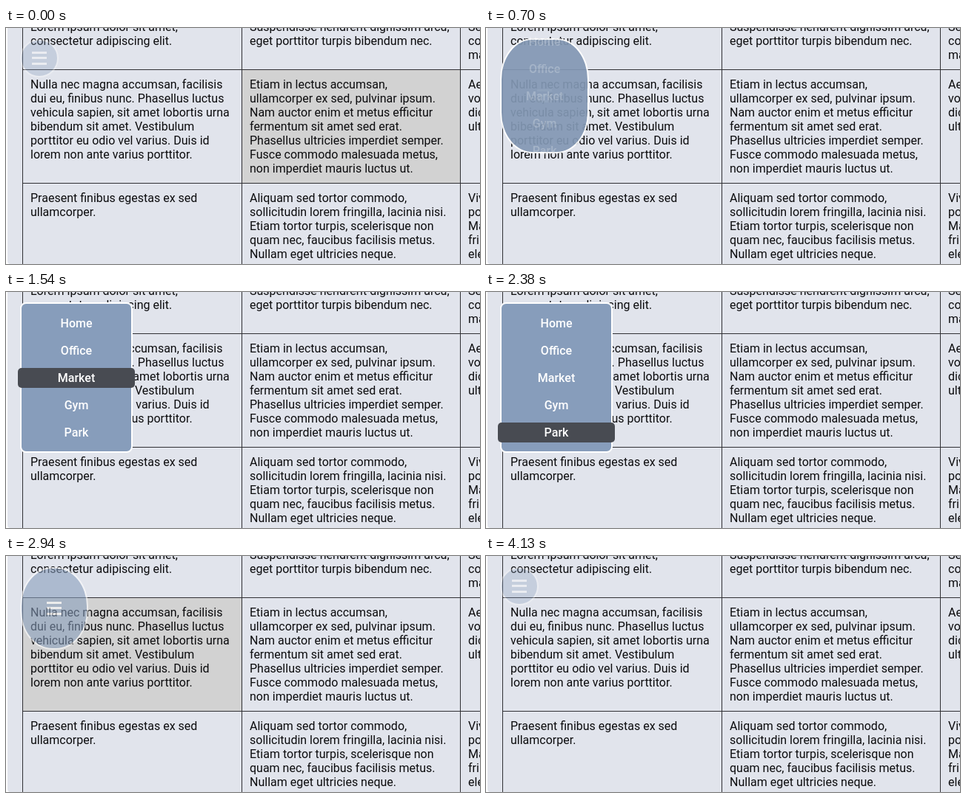
Animation, 640 px wide and 320 px high, one loop 4200 ms. Source, as an HTML page:

```html
<!DOCTYPE html>
<html lang="la">
<head>
<meta charset="utf-8">
<style>
html, body { margin: 0; width: 640px; height: 320px; overflow: hidden; background: #fff; }
body { position: relative; font: 16px/19px Roboto, sans-serif; color: #0c0c0e; }
#page { position: absolute; inset: 0 0 0 2px; background: #e1e4ec; border-bottom-left-radius: 4px; }
.cell {
  position: absolute; box-sizing: border-box; padding: 10px; white-space: pre;
  border: solid #303034; border-width: 1px 0 0 1px;
}
#menu { position: absolute; box-sizing: border-box; border: 2px solid #fff; color: #fff; }
#icon, #list { position: absolute; left: 50%; top: 50%; }
#icon i { position: absolute; left: -10px; width: 20px; height: 3px; background: #fff; }
.item {
  position: absolute; left: -79px; width: 158px; height: 27px;
  border-radius: 5px; text-align: center; font-weight: 500; line-height: 27px;
}
</style>
</head>
<body>
<div id="page"></div>
<div id="menu"><div id="icon"></div><div id="list"></div></div>
<script>
const LOOP = 4200, STEP = 70;
const $ = id => document.getElementById(id);
const menu = $('menu'), icon = $('icon'), list = $('list');

const lefts = [22, 318, 613, 909], tops = [-22, 56, 210, 364];
const texts = [
  ['Lorem ipsum dolor sit amet,\nconsectetur adipiscing elit.',
   'Suspendisse hendrerit dignissim arcu,\neget porttitor turpis bibendum nec.',
   'Sed\ncommodo\nmattis'],
  ['Nulla nec magna accumsan, facilisis\ndui eu, finibus nunc. Phasellus luctus\nvehicula sapien, sit amet lobortis urna\nbibendum sit amet. Vestibulum\nporttitor eu odio vel varius. Duis id\nlorem non ante varius porttitor.',
   'Etiam in lectus accumsan,\nullamcorper ex sed, pulvinar ipsum.\nNam auctor enim et metus efficitur\nfermentum sit amet sed erat.\nPhasellus ultricies imperdiet semper.\nFusce commodo malesuada metus,\nnon imperdiet mauris luctus ut.',
   'Aenean\nvolutpat\ndictum\nultrices'],
  ['Praesent finibus egestas ex sed\nullamcorper.',
   'Aliquam sed tortor commodo,\nsollicitudin lorem fringilla, lacinia nisi.\nEtiam tortor turpis, scelerisque non\nquam nec, faucibus facilisis metus.\nNullam eget ultricies neque.',
   'Vivamus\nposuere\nMauris\nfringilla\nelementum']
];

function add(parent, cls, text, style) {
  const el = document.createElement(cls ? 'div' : 'i');
  el.className = cls;
  el.textContent = text;
  Object.assign(el.style, style);
  parent.append(el);
  return el;
}

const cells = texts.map((row, r) => row.map((text, c) => {
  const el = add(document.body, 'cell', text, {
    left: lefts[c] + 'px', top: tops[r] + 'px',
    width: lefts[c + 1] - lefts[c] + 'px', height: tops[r + 1] - tops[r] + 'px'
  });
  document.body.insertBefore(el, menu);
  return el;
}));
for (const y of [-9, -2, 6]) add(icon, '', '', { top: y + 'px' });
const items = ['Home', 'Office', 'Market', 'Gym', 'Park'].map((name, i) =>
  add(list, 'item', name, { top: 37 * (i - 2) - 13 + 'px' }));

// Pointer stays: [row, column, from, to] and the start of each item's highlight
const stays = [[1, 1, 0, 140], [1, 0, 140, 210], [1, 0, 2800, 3430], [2, 0, 3430, 3920]];
const marks = [1020, 1190, 1400, 1750, 2170, 2560];

const clamp = x => Math.min(1, Math.max(0, x));
const mix = (a, b, k) => a + (b - a) * k;
const ramp = (t, from, span) => clamp((t - from) / span);

// CSS "ease" curve
function ease(x) {
  let lo = 0, hi = 1;
  for (let i = 0; i < 20; i++) {
    const s = (lo + hi) / 2;
    if (.75 * s * (1 - s) + s ** 3 < x) lo = s; else hi = s;
  }
  return .3 * lo * (1 - lo) ** 2 + 3 * lo * lo * (1 - lo) + lo ** 3;
}

function draw(t) {
  cells.forEach((row, r) => row.forEach((el, c) => {
    const on = stays.some(([y, x, a, b]) => y === r && x === c && t >= a && t < b);
    el.style.background = on ? '#d2d2d2' : '';
  }));

  const open = t < 2800 ? ease(ramp(t, 540, 400)) : 1 - ease(ramp(t, 2800, 400));
  const hover = t < 2800 ? ramp(t, 180, 170) : 0;
  const dark = .2 * hover * (1 - open);
  const rgb = [[135, 157, 187], [72, 75, 82]];
  const width = mix(52, 152, open), height = mix(52, 204, open);
  const round = 1 - open ** 3;
  Object.assign(menu.style, {
    left: '19px', top: mix(15, 14, open) + 'px',
    width: width + 'px', height: height + 'px',
    borderRadius: `calc(${50 * round}% + ${8 * (1 - round)}px)`,
    background: `rgb(${rgb[0].map((v, i) => mix(v, rgb[1][i], dark))})`,
    opacity: mix(mix(.3, .75, hover), 1, open)
  });
  icon.style.opacity = clamp((.7 - open) / .3);
  list.style.opacity = clamp((open - .6) / .35);
  items.forEach((el, i) => {
    const a = ramp(t, marks[i] - 70, 100) - ramp(t, marks[i + 1] - 70, 100);
    el.style.background = `rgba(72,75,82,${a})`;
  });
}

const start = performance.now();
function tick() {
  const t = (performance.now() - start) % LOOP;
  draw(Math.floor(t / STEP) * STEP);
  requestAnimationFrame(tick);
}
tick();
</script>
</body>
</html>
```
